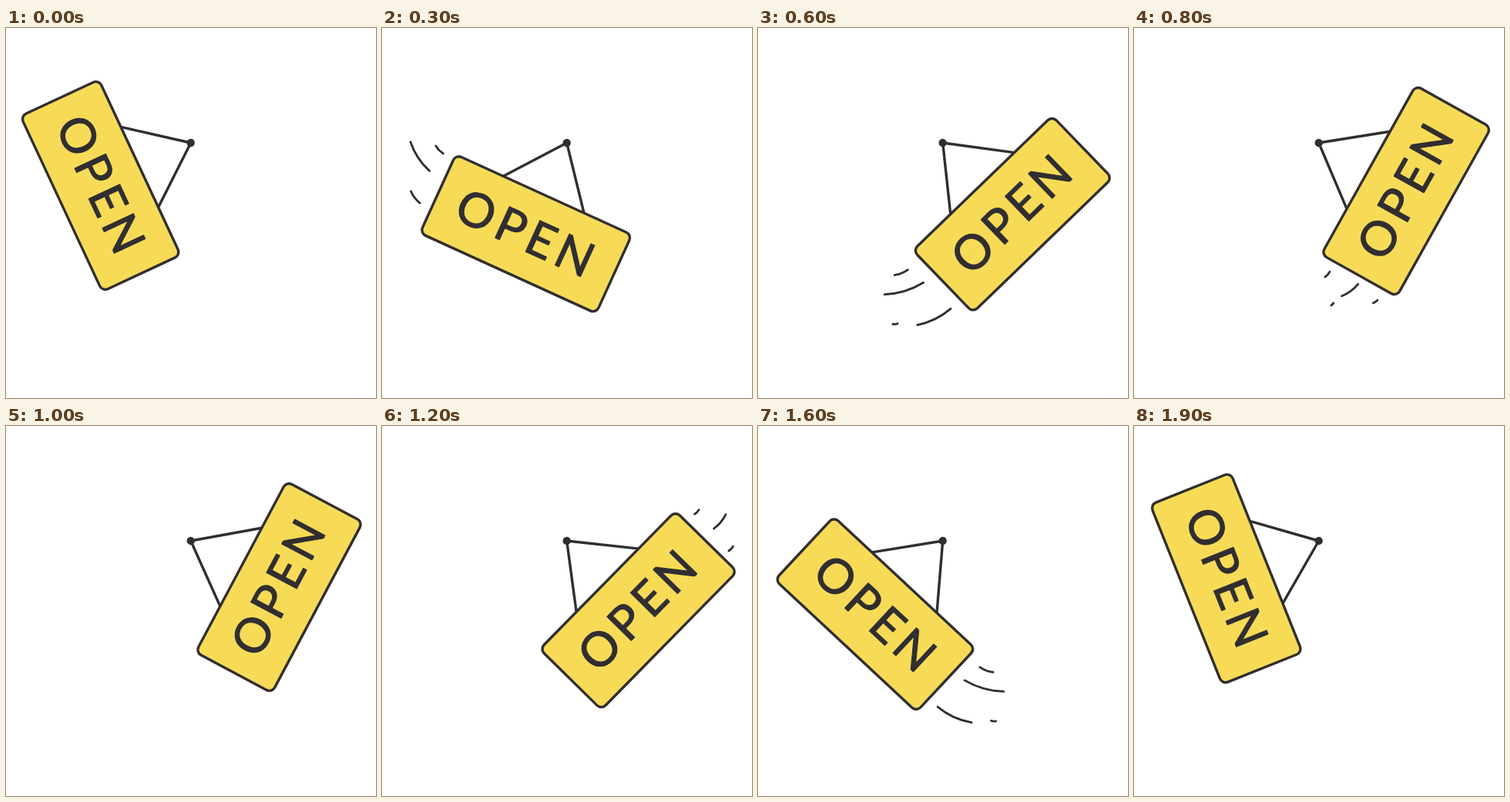
Recreate the animation shown at these times as an HTML page. Size 480 by 480 pixels, loop 2000 ms.

```html
<!DOCTYPE html>
<html lang="en">
<head>
<meta charset="utf-8">
<title>Swinging open sign</title>
<style>
  html, body { margin: 0; width: 100%; height: 100%; overflow: hidden; background: #fff; }
  svg { display: block; width: 100vw; height: 100vh; }
  .line { fill: none; stroke: #302e31; stroke-width: 3.4; stroke-linecap: round; stroke-linejoin: round; }
  .trail { stroke-width: 2.8; }
  .board { fill: #f7db57; }
  text { font: 62px Lato, sans-serif; letter-spacing: 6.2px; fill: #302e31; stroke: #302e31; stroke-width: 1.2; stroke-linejoin: round; }
</style>
</head>
<body>
<svg viewBox="0 0 480 480">
  <g id="sign">
    <path class="line" d="M-57 73.5L0 0L58 73.5"/>
    <circle r="5.2" fill="#302e31"/>
    <rect class="line board" x="-124.7" y="73.5" width="251" height="112" rx="8"/>
    <text x="-95" y="150.5">OPEN</text>
    <path id="trails" class="line trail"/>
  </g>
</svg>
<script>
const STEP = 100;

// Sign angle in degrees for each step of the swing.
const angles = [65, 56.5, 42, 24.5, 2, -20.1, -44, -55, -60.8, -64,
                -62, -56, -45.5, -23, 0, 24, 43, 57, 65, 68.2];

// Speed lines beside the board, relative to the nail: inner x, y, outer x, y.
const short = [[141, 94, 149, 94], [145, 125, 169, 123], [138, 159, 146, 159]];
const rising = [[140, 79, 153, 74], [147, 107, 185, 83], [141, 150, 158, 141]];
const full = [[147, 87, 164, 80], [144, 113, 191, 89], [142, 162, 188, 147], [205, 128, 210, 124]];
const wide = [[145, 83, 176, 65], [147, 121, 212, 70], [150, 163, 184, 139], [193, 55, 194, 53]];
const fading = [[139, 94, 148, 92], [135, 134, 159, 123], [141, 166, 147, 163], [172, 118, 176, 117]];

// Poses visible at each step; two poses are averaged.
const trailPoses = {
  2: [short], 3: [rising], 4: [rising, full], 5: [full], 6: [full], 7: [full], 8: [fading],
  12: [short], 13: [short, wide], 14: [wide], 15: [wide, full], 16: [full], 17: [full]
};

const sign = document.getElementById('sign');
const trails = document.getElementById('trails');

function curve([x0, y0, x1, y1]) {
  const bend = 0.13;
  const cx = (x0 + x1) / 2 - (y1 - y0) * bend;
  const cy = (y0 + y1) / 2 + (x1 - x0) * bend;
  return `M${x0} ${y0}Q${cx} ${cy} ${x1} ${y1}`;
}

function trailPath(step) {
  const poses = trailPoses[step];
  if (!poses) return '';
  const [a, b = a] = poses;
  return a.map((line, i) => curve(line.map((v, k) => (v + b[i][k]) / 2))).join('');
}

function draw() {
  const step = Math.floor(performance.now() / STEP) % angles.length;
  const side = step < 10 ? -1 : 1;
  sign.setAttribute('transform', `translate(239.7 149) rotate(${angles[step]})`);
  trails.setAttribute('transform', `scale(${side} 1)`);
  trails.setAttribute('d', trailPath(step));
  requestAnimationFrame(draw);
}
draw();
</script>
</body>
</html>
```
